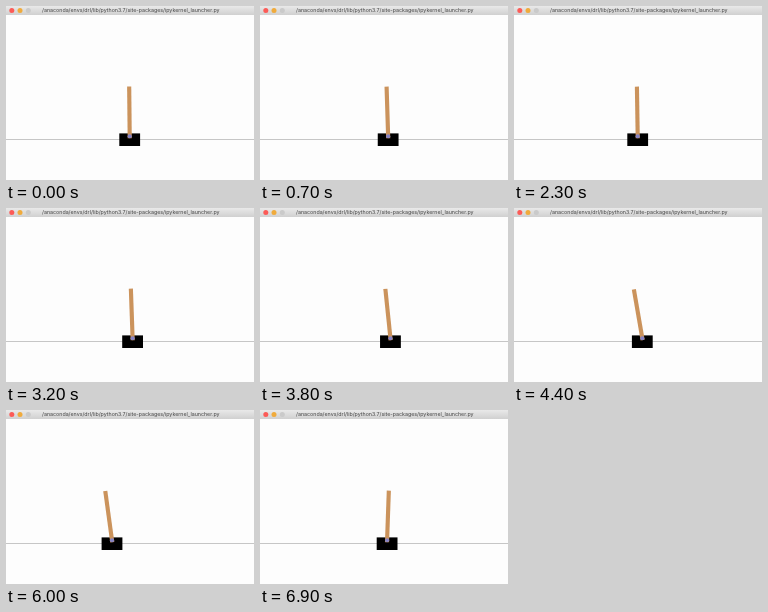
These frames come from a looping animation (248 px wide and 174 px high, 7 s). An HTML page:

```html
<!DOCTYPE html>
<html lang="en">
<head>
<meta charset="utf-8">
<title>Cart pole</title>
<style>
  html, body { margin: 0; width: 100%; height: 100%; overflow: hidden; background: #fdfdfd; }
  svg { display: block; width: 248px; height: 174px; }
  text { font: 5.31px Inter, sans-serif; fill: #444; text-anchor: middle; }
</style>
</head>
<body>
<svg viewBox="0 0 248 174">
  <linearGradient id="bar" x2="0" y2="1">
    <stop stop-color="#e9e9e9"/>
    <stop offset="1" stop-color="#d0d0d0"/>
  </linearGradient>
  <rect width="248" height="9" fill="url(#bar)"/>
  <circle cx="5.8" cy="4.5" r="2.5" fill="#fc5b57"/>
  <circle cx="14" cy="4.5" r="2.5" fill="#f0ab3c"/>
  <circle cx="22.3" cy="4.5" r="2.5" fill="#cacaca"/>
  <text x="124.8" y="6.4">/anaconda/envs/drl/lib/python3.7/site-packages/ipykernel_launcher.py</text>
  <path d="M0 133.5H248" stroke="#c6c6c6"/>
  <g id="cart">
    <rect x="-10.4" y="127.4" width="20.8" height="12.6"/>
    <rect id="pole" x="-2.07" y="80.6" width="4.14" height="51.6" fill="#cb935c"/>
    <circle cy="130.2" r="2.07" fill="#8683c4"/>
  </g>
</svg>
<script>
const LOOP = 7000, STEP = 100, SWAY = 3;
const cart = document.getElementById('cart');
const pole = document.getElementById('pole');

const start = { at: 0, x: 123.7, tilt: -0.6 };
const poses = [
  start,
  { at: 1400, x: 126.6, tilt: -3 },
  { at: 2300, x: 123.7, tilt: -0.9 },
  { at: 3200, x: 126.6, tilt: -2 },
  { at: 4400, x: 128.3, tilt: -9.8 },
  { at: 6000, x: 106, tilt: -7.8 },
  { at: 6900, x: 127.1, tilt: 2 },
  { ...start, at: LOOP },
];

const mix = (a, b, p) => a + (b - a) * p;

function draw() {
  const time = Math.floor(performance.now() % LOOP / STEP) * STEP;
  const next = poses.findIndex(pose => pose.at > time);
  const from = poses[next - 1], to = poses[next];
  const p = (time - from.at) / (to.at - from.at);
  const ease = p * p * (3 - 2 * p);
  // The cart drifts right between poses to catch the pole.
  const x = mix(from.x, to.x, ease) + SWAY * Math.sin(Math.PI * p) ** 2;
  cart.setAttribute('transform', `translate(${x} 0)`);
  pole.setAttribute('transform', `rotate(${mix(from.tilt, to.tilt, ease)} 0 130.2)`);
  requestAnimationFrame(draw);
}
draw();
</script>
</body>
</html>
```
